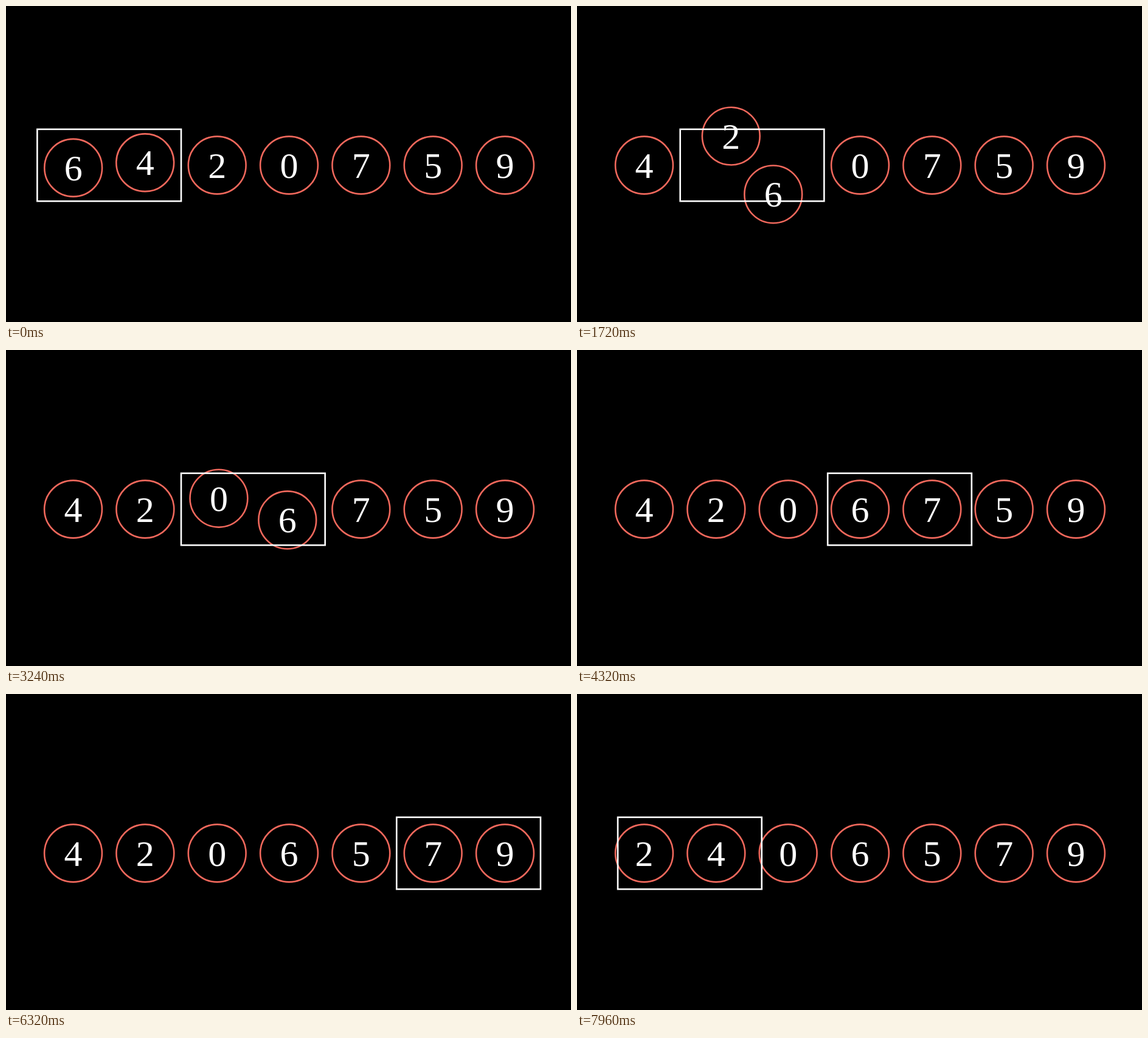
These frames come from a looping animation (929x520 px, 8 s). An HTML page:

```html
<!DOCTYPE html>
<html lang="en">
<head>
<meta charset="utf-8">
<title>Bubble sort</title>
<style>
  html, body { margin: 0; width: 100%; height: 100%; overflow: hidden; background: #000; }
  svg { display: block; width: 929px; height: 520px; }
  circle, rect { fill: none; stroke-width: 2.6; }
  circle { stroke: #f0685c; }
  rect { stroke: #fff; }
  text { fill: #fff; font: 60px "Liberation Serif", serif; text-anchor: middle; }
</style>
</head>
<body>
<svg id="stage" viewBox="0 0 929 520"></svg>
<script>
const LOOP = 8000, TICK = 40;
const POSES_PER_STEP = 30, FIRST_POSE = 4.74, POSES_PER_TICK = 1.684;
const LEFT = 110.5, MIDDLE = 262, GAP = 118.33, RADIUS = 47.4;
const START = [6, 4, 2, 0, 7, 5, 9];

const stage = document.getElementById("stage");

function add(parent, tag, attributes) {
  const node = document.createElementNS("http://www.w3.org/2000/svg", tag);
  for (const name in attributes) node.setAttribute(name, attributes[name]);
  return parent.appendChild(node);
}

const balls = {};
for (const value of START) {
  balls[value] = add(stage, "g", {});
  add(balls[value], "circle", { r: RADIUS });
  add(balls[value], "text", { y: 20.5 }).textContent = value;
}
const frame = add(stage, "rect", { x: -GAP, y: -GAP / 2, width: 2 * GAP, height: GAP });

// Each step is either a swap at a pair, or a move of the frame to another pair.
function planSteps(count) {
  const order = [...START], steps = [];
  let pair = 0;
  while (steps.length < count) {
    if (order[pair] > order[pair + 1]) {
      steps.push({ order: [...order], from: pair, to: pair, swap: true });
      [order[pair], order[pair + 1]] = [order[pair + 1], order[pair]];
    }
    const next = (pair + 1) % (START.length - 1);
    steps.push({ order: [...order], from: pair, to: next, swap: false });
    pair = next;
  }
  return steps;
}
const steps = planSteps(12);

const sigmoid = x => 1 / (1 + Math.exp(-x));
function smooth(t) {
  const tail = sigmoid(-5);
  return (sigmoid(10 * (t - 0.5)) - tail) / (1 - 2 * tail);
}

function place(node, x, y) {
  node.setAttribute("transform", `translate(${x} ${y})`);
}

function draw(time) {
  const tick = Math.floor((time % LOOP) / TICK);
  const pose = Math.floor(FIRST_POSE + POSES_PER_TICK * tick);
  const { order, from, to, swap } = steps[Math.floor(pose / POSES_PER_STEP)];
  const progress = smooth((pose % POSES_PER_STEP + 0.5) / POSES_PER_STEP);

  order.forEach((value, slot) => place(balls[value], LEFT + slot * GAP, MIDDLE));
  const center = LEFT + (from + (to - from) * progress + 0.5) * GAP;
  place(frame, center, MIDDLE);

  if (swap) {
    const dx = Math.cos(progress * Math.PI) * GAP / 2;
    const dy = Math.sin(progress * Math.PI) * GAP / 2;
    place(balls[order[from]], center - dx, MIDDLE + dy);
    place(balls[order[from + 1]], center + dx, MIDDLE - dy);
  }
}

const began = performance.now();
function animate() {
  draw(performance.now() - began);
  requestAnimationFrame(animate);
}
animate();
</script>
</body>
</html>
```
